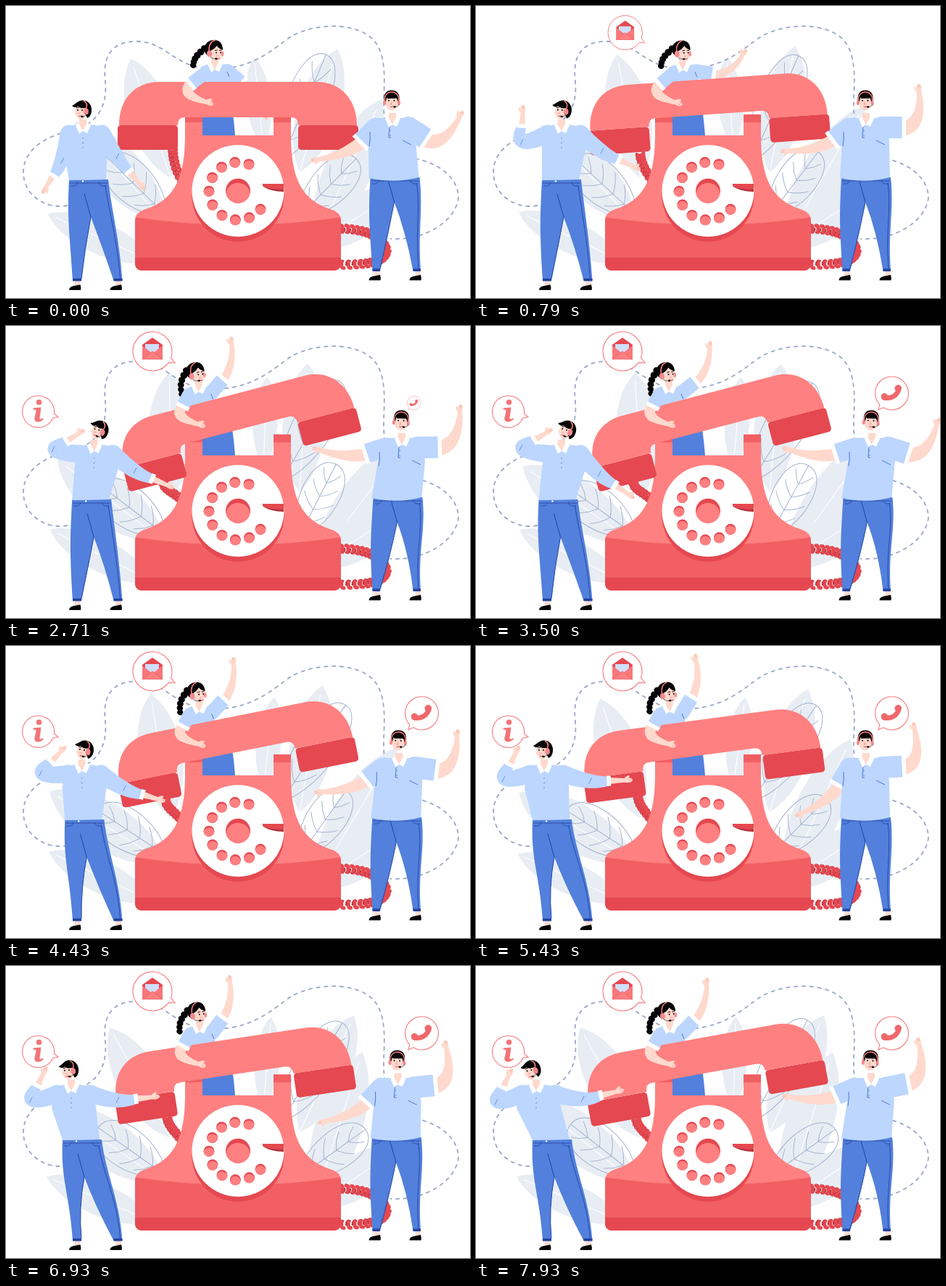
Recreate the animation shown at these times as an HTML page with a canvas. Size 640 by 404 pixels, loop 8000 ms.

```html
<!DOCTYPE html>
<html lang="en">
<head>
<meta charset="utf-8">
<title>Call centre</title>
<style>
html, body { margin: 0; width: 100%; height: 100%; overflow: hidden; background: #fff; }
canvas { display: block; width: 640px; height: 404px; }
</style>
</head>
<body>
<canvas id="stage"></canvas>
<script>
const W = 640, H = 404, LOOP = 8000, STEP = 1000 / 14;
const canvas = document.getElementById('stage');
const g = canvas.getContext('2d');
const ratio = window.devicePixelRatio || 1;
canvas.width = W * ratio;
canvas.height = H * ratio;

const CORAL = '#ff8080', MID = '#f15f63', RED = '#e54850', DEEP = '#b3323c', PAD = '#f58a8e';
const SHIRT = '#bcd6fe', JEANS = '#5280dc', NAVY = '#2243a0', FOLD = '#3f6ccb', SKIN = '#ffd9cd';
const LEAF = '#e8edf4', VEIN = '#a3b2cc', BLACK = '#050507', WHITE = '#fff';

// Motion: everyone shares five beats, then a slow late drift
const BEATS = [0, 790, 1930, 3500, 5430];
const rad = d => d * Math.PI / 180;
const clamp = u => Math.max(0, Math.min(1, u));
const late = t => clamp((t - 5430) / 2500) ** 2;
const breeze = t => Math.cos((t - 2700) / 9400 * 2 * Math.PI);
const drift = t => Math.cos((t - 5200) / 12000 * 2 * Math.PI);

// Smooth curve through one value per beat, level at each turning point
function mix(t, ...v) {
  const n = BEATS.length - 1;
  if (t >= BEATS[n]) return v[n];
  const i = BEATS.findIndex((b, k) => t < BEATS[k + 1]);
  const span = BEATS[i + 1] - BEATS[i], u = (t - BEATS[i]) / span;
  const slope = k => {
    if (k === 0) return (v[1] - v[0]) / BEATS[1] * span;
    if (k === n || (v[k] - v[k - 1]) * (v[k + 1] - v[k]) <= 0) return 0;
    return (v[k + 1] - v[k - 1]) / (BEATS[k + 1] - BEATS[k - 1]) * span;
  };
  const d = v[i + 1] - v[i], a = slope(i), b = slope(i + 1);
  return v[i] + u * (a + u * (3 * d - 2 * a - b + u * (a + b - 2 * d)));
}

const reach = (p, len, deg) => [p[0] + len * Math.cos(rad(deg)), p[1] + len * Math.sin(rad(deg))];
const along = (a, b, u) => [a[0] + (b[0] - a[0]) * u, a[1] + (b[1] - a[1]) * u];
const heading = (a, b) => Math.atan2(b[1] - a[1], b[0] - a[0]);

function shape(d, fill, stroke, lw = 1) {
  const p = new Path2D(d);
  if (fill) { g.fillStyle = fill; g.fill(p); }
  if (stroke) { g.strokeStyle = stroke; g.lineWidth = lw; g.stroke(p); }
}

function oval(x, y, rx, ry, fill, rot = 0) {
  g.fillStyle = fill;
  g.beginPath();
  g.ellipse(x, y, rx, ry, rot, 0, Math.PI * 2);
  g.fill();
}

const dot = (x, y, r, fill) => oval(x, y, r, r, fill);

function box(x, y, w, h, fill) {
  g.fillStyle = fill;
  g.fillRect(x, y, w, h);
}

function place(x, y, angle, draw, scale = 1) {
  g.save();
  g.translate(x, y);
  g.rotate(angle);
  g.scale(scale, scale);
  draw();
  g.restore();
}

// Tapered curve from a to c, bent towards b
function limb(a, b, c, wa, wb, wc, fill, bend = 0.85) {
  const n = 22, left = [], right = [];
  const m = along(along(a, c, 0.5), b, 1 + bend);
  for (let i = 0; i <= n; i++) {
    const u = i / n, from = along(a, m, u), to = along(m, c, u);
    const [x, y] = along(from, to, u), dir = heading(from, to);
    const w = (u < 0.5 ? wa + (wb - wa) * u * 2 : wb + (wc - wb) * (u * 2 - 1)) / 2;
    left.push([x - Math.sin(dir) * w, y + Math.cos(dir) * w]);
    right.unshift([x + Math.sin(dir) * w, y - Math.cos(dir) * w]);
  }
  g.fillStyle = fill;
  g.beginPath();
  left.concat(right).forEach(p => g.lineTo(p[0], p[1]));
  g.fill();
  dot(a[0], a[1], wa / 2, fill);
}

function cuff(from, to, width) {
  place(to[0], to[1], heading(from, to), () => box(-2.5, -width / 2, 5.5, width, WHITE));
}

function hand(from, to) {
  place(to[0], to[1], heading(from, to), () => {
    oval(0, 0, 6.5, 3.5, SKIN);
    oval(-1, -4, 4, 1.5, SKIN, -0.5);
    shape('M1 -1 L6 -1.3 M1 1.2 L6 1', null, '#f4a79b', 0.6);
  });
}

function longArm(s, upper, fore, len1, len2) {
  const e = reach(s, len1, upper), h = reach(e, len2, fore), w = along(e, h, 0.5);
  limb(w, along(w, h, 0.5), h, 9, 7, 5, SKIN);
  hand(w, h);
  limb(s, e, w, 25, 20, 13, SHIRT, 0.75);
  cuff(e, w, 14);
  shape(`M${e[0] + 3} ${e[1] - 5} l-4 8`, null, '#5b8be0', 0.9);
}

function shortArm(s, upper, fore, len1, len2, sleeve, arm) {
  const e = reach(s, len1, upper), h = reach(e, len2, fore), c = along(s, e, 0.64);
  limb(s, e, h, arm, arm * 0.85, 5.5, SKIN, 0.6);
  hand(e, h);
  limb(s, along(s, c, 0.5), c, sleeve, sleeve, sleeve, SHIRT);
  cuff(s, c, sleeve + 1);
}

// Leaves lean from upright by angle + swing * wind
const leaves = [
  { x: 227, y: 238, len: 174, w: 40, angle: -15, swing: 14.5, wind: breeze },
  { x: 205, y: 355, len: 162, w: 30, angle: -65, swing: 2, wind: breeze },
  { x: 220, y: 300, len: 188, w: 43, angle: -50, swing: -9, wind: drift },
  { x: 405, y: 230, len: 178, w: 39, angle: 14.5, swing: -11, wind: breeze },
  { x: 355, y: 195, len: 125, w: 23, angle: 0.5, swing: 7, wind: drift },
  { x: 425, y: 330, len: 221, w: 43, angle: 27, swing: 10, wind: breeze },
  { x: 420, y: 335, len: 153, w: 38, angle: 57, swing: 1, wind: breeze },
  { x: 380, y: 215, len: 160, w: 36, angle: 28, swing: 6, wind: drift, veined: true },
  { x: 404, y: 292, len: 113, w: 34, angle: 41, swing: -14, wind: breeze, veined: true },
  { x: 221, y: 290, len: 115, w: 36, angle: -51, swing: -6, wind: drift, veined: true }
];

function drawLeaf({ x, y, len: L, w, angle, swing, wind, veined }, t) {
  place(x, y, rad(angle + swing * wind(t) - 90), () => {
    if (!veined) {
      shape(`M0 0 C${L * .25} ${-w} ${L * .78} ${-w} ${L} 0 C${L * .78} ${w} ${L * .25} ${w} 0 0Z`, LEAF);
      shape(`M0 0 L${L * .93} 0`, null, WHITE, 1.1);
      return;
    }
    shape(`M0 0 C${L * .25} ${-w} ${L} ${-w * 1.1} ${L} 0 C${L} ${w * 1.1} ${L * .25} ${w} 0 0Z M0 0 H${L}`, null, VEIN);
    for (let k = 0.2; k < 0.8; k += 0.18) {
      const rise = w * 0.66 * Math.sin(Math.PI * Math.min(0.8, k + 0.12));
      for (const s of [-rise, rise]) shape(`M${L * k} 0 Q${L * (k + .06)} ${s * .6} ${L * (k + .16)} ${s}`, null, VEIN, 0.9);
    }
  });
}

function coil(p, n) {
  const point = u => {
    const [a, b, c] = [0, 1, 2].map(i => along(p[i], p[i + 1], u));
    return along(along(a, b, u), along(b, c, u), u);
  };
  g.lineCap = 'round';
  for (let i = 0; i < n; i++) {
    const a = point(i / n), b = point((i + 1) / n), m = along(a, b, 0.5);
    place(m[0], m[1], heading(a, b), () => {
      shape('M-1 5 Q4 6 4 0', null, DEEP, 3);
      shape('M-2 -4.5 Q2.5 -5 1 4.5', null, RED, 5);
    });
  }
  g.lineCap = 'butt';
}

function dashes() {
  g.setLineDash([5.8, 5]);
  shape('M85 276 C55 282 24 262 24 230 C24 196 60 178 92 172 C125 163 140 140 137 105 C132 65 150 48 182 49'
    + ' C215 50 230 76 262 84 C330 97 365 62 392 43 C425 23 480 22 505 45 C525 65 522 100 521 130'
    + ' C520 170 530 200 560 210 C600 217 624 240 624 265 C620 300 575 325 530 322', null, '#9aa8c6', 1.8);
  g.setLineDash([]);
}

function cup(x, y, r, drop) {
  g.save();
  g.beginPath();
  g.arc(x, y, r, 0, 7);
  g.clip();
  dot(x, y, r + 1, RED);
  dot(x, y + drop, r, CORAL);
  g.restore();
}

function phoneBase() {
  g.save();
  g.clip(new Path2D('M247 150 H271 V179 H369 V150 H393 V178 C393 245 412 270 450 282 Q462 286 462 297'
    + ' V355 Q462 366 451 366 H189 Q178 366 178 355 V297 Q178 286 190 282 C228 270 247 245 247 178Z'));
  box(170, 140, 300, 230, CORAL);
  shape('M170 291 Q320 315 470 291 V370 H170Z', MID);
  box(170, 348, 300, 20, RED);
  box(247, 150, 24, 11, MID);
  box(369, 150, 24, 11, MID);
  g.restore();
  dot(320, 262.5, 63.5, RED);
  dot(320, 255.7, 63.5, WHITE);
  cup(320, 255.7, 17, 6);
  for (let i = 0; i < 10; i++) {
    const [x, y] = reach([320, 256], 40, -68 - i * 28.1);
    cup(x, y, 7.5, 2.5);
  }
  shape('M354 246 H383 V257 Q366 257 355 250Z', DEEP);
  shape('M354 246 H383 V254 Q366 254 355 250 Q354 249 354 246Z', RED);
}

function handset(t, tilt) {
  const x = mix(t, 320, 322.5, 326, 326, 315) + 5 * late(t);
  const y = mix(t, 182, 178, 171, 171, 179) - 3 * late(t);
  place(x, y, rad(tilt), () => {
    g.translate(-320, -182);
    g.fillStyle = RED;
    for (const left of [154, 403]) {
      g.beginPath();
      g.roundRect(left, 165, 83, 34, 4.5);
      g.fill();
    }
    shape('M156 165 C156 128 178 105 212 105 H429 C462 105 484 130 484 165 H403 Q403 154 393 154 H246 Q237 154 237 165Z', CORAL);
  });
}

function collar(x, y) {
  shape(`M${x - 5} ${y - 12} h10 v9 l-5 7 l-5 -8Z`, SKIN);
  shape(`M${x - 6} ${y - 7} l6 11 l-5 4 l-5 -12Z M${x + 6} ${y - 8} l-6 12 l6 3 l5 -11Z`, WHITE);
}

function legs(hip, y, half, fl, fr, ankle, drop, cuffW) {
  const cx = hip + (half < 30 ? 3 : -1), cy = y + drop, l2 = fl + cuffW, r2 = fr + cuffW;
  for (const x of [fl, fr]) {
    box(x + 3, ankle, 7, 10, SKIN);
    shape(`M${x - 5} ${ankle + 16} q0 -5 8 -6 l7.5 -1.5 q1.5 4.5 .5 7.5Z`, BLACK);
  }
  shape(`M${hip - half} ${y} C${hip - half - 3} ${y + 55} ${fl - 4} ${ankle - 60} ${fl} ${ankle + 3} H${l2}`
    + ` Q${cx - 8} ${cy + 42} ${cx} ${cy} Q${cx + 16} ${cy + 42} ${fr} ${ankle + 3} H${r2}`
    + ` C${r2 - 4} ${ankle - 55} ${hip + half + 5} ${y + 45} ${hip + half} ${y}Z`, JEANS);
  shape(`M${cx - 9} ${cy - 32} L${cx} ${cy} Q${cx - 8} ${cy + 42} ${l2} ${ankle}`, null, NAVY);
  shape(`M${r2 - 3} ${ankle} C${r2 - 7} ${ankle - 55} ${hip + half + 1} ${y + 45} ${hip + half - 4} ${y + 8}`, null, NAVY, 0.9);
  shape(`M${hip - half + 1} ${y + 5} H${hip + half - 1} M${hip - half + 2} ${y + 9} q9 1 10 -5`
    + ` M${hip + half - 3} ${y + 9} q-9 1 -10 -5`, null, NAVY, 0.8);
  box(fl, ankle, cuffW, 3.6, NAVY);
  box(fr, ankle, cuffW, 3.6, NAVY);
  dot(hip - 8, y + 2.5, 1.2, WHITE);
}

function torso(x, cy, sl, sr, hip, half, y, top, pad, sag) {
  shape(`M${x - 9} ${cy - 5} Q${sl[0]} ${sl[1] - top} ${sl[0] - 4} ${sl[1] - top + 2} L${sl[0] - pad} ${sl[1] + 20}`
    + ` L${hip - half} ${y} Q${hip} ${y + sag} ${hip + half - 3} ${y - 1} L${sr[0] + pad} ${sr[1] + 18}`
    + ` L${sr[0] + 3} ${sr[1] - top + 1} L${x + 10} ${cy - 5}Z`, SHIRT);
}

function buttons(x, y) {
  for (let i = 0; i < 3; i++) dot(x, y + i * 6.5, 0.8, '#5b7fc4');
}

function face(eyes, y, mouth) {
  for (const x of eyes) {
    dot(x, y, 1, BLACK);
    shape(`M${x - 2} ${y - 3} l3.6 -.5`, null, BLACK, 0.9);
  }
  oval(mouth - 1, y + 4.5, 2, 1.3, '#ffb9b0');
  shape(`M${mouth - 2} ${y + 8} q2 1.6 4 -.4`, null, '#d9434c');
}

function mic(x, y, tx, ty) {
  shape(`M${x} ${y} Q${x} ${ty} ${tx} ${ty}`, null, '#555', 0.8);
  oval(tx, ty, 1.8, 1.2, BLACK);
}

function headLeft() {
  oval(-1.5, 1, 8, 11, SKIN);
  shape('M-9 0 L-11 4 L-8 5Z', SKIN);
  shape('M-14 -7 Q-10 -9 -8 -11 Q-1 -17 7 -13 Q14 -8 13 1 Q12 8 7 10 L4 4 L5 -4 Q-2 -3 -6 -6 Q-10 -3 -14 -7Z', BLACK);
  face([-6, 0], -1, -3);
  shape('M5 -2 Q9 -10 2 -14', null, CORAL, 1.5);
  oval(5.5, 1, 3.4, 4.4, PAD);
  mic(5, 4, 0, 8);
}

function headRight() {
  oval(0, 2, 9, 11.5, SKIN);
  shape('M-10 3 Q-13 -14 0 -14.5 Q13 -14 10 3 L8 1 Q8 -4 4 -4 Q-3 -2 -7 -4 L-8 1Z', BLACK);
  face([-4, 3.5], 0, 0);
  shape('M0 1 l-1 4 h2', null, '#e89a8f', 0.7);
  shape('M-9.5 0 C-11.5 -16 11.5 -16 9.5 0', null, CORAL, 1.4);
  oval(-10, 3, 2, 3.4, PAD);
  oval(10, 3, 2, 3.4, PAD);
  mic(9.5, 5, 4, 8.5);
}

function headWoman() {
  oval(2, 4, 9, 10, SKIN);
  shape('M-15 -2 Q-13 -15 0 -15 Q11 -14 11 -1 Q4 -4 3 -7 Q-1 -2 -6 0 L-6 7 Q-13 7 -15 -2Z', BLACK);
  face([2, 8], 2.5, 5);
  shape('M-8 1 Q-9 -12 1 -15', null, CORAL, 1.4);
  oval(-7.5, 4, 3.4, 4.4, PAD);
  oval(10.5, 4, 1.8, 3.4, PAD);
  mic(-6, 8, 2, 11);
}

// Her lean to the left, and the collar that follows it
function womanLean(t) {
  const lean = mix(t, 0, 3, 20, 22, 21);
  return { lean, x: 288 - lean, y: 84 + lean * 0.13 };
}

function womanBehind(t) {
  const { lean, x, y } = womanLean(t), l = late(t);
  shape('M271 120 H308 Q314 150 316 179 H271Z', JEANS);
  shortArm([x + 17, y + 6], mix(t, 40, 8, -60, -38, -58) + 12 * l, mix(t, 60, -50, -97, -80, -94) + 12 * l, 41, 41, 20, 13);
  shape(`M${x - 8} ${y - 4} l-11 4 l-2 38 h43 l-1 -39 l-13 -3Z`, SHIRT);
  shape(`M${x + 17} ${y + 7} l3 7`, null, FOLD, 0.9);
  collar(x, y);
  const hx = x - lean * 0.12, hy = y - 22;
  const root = [hx - 14, hy - 3], tip = reach([hx, hy], 36, mix(t, 146, 145, 124, 127, 134));
  for (let i = 0; i <= 5; i++) {
    const u = i / 5, p = along(root, tip, u);
    oval(p[0] - Math.sin(u * Math.PI) * 4, p[1], 5.2 - u, 4.6 - u * 0.8, BLACK, 0.6);
  }
  place(hx, hy, rad(-lean * 0.3), headWoman);
}

function womanInFront(t) {
  const { lean, x, y } = womanLean(t);
  const s = [x - 14, y + 9], c = [x - 33 + lean / 2, y + 24];
  const e = [x - 36 + lean / 2, y + 38], h = [x - 8 + lean / 2, y + 50];
  limb(c, e, h, 15, 14, 5, SKIN);
  hand(e, h);
  limb(s, along(s, c, 0.5), c, 18, 18, 18, SHIRT);
  cuff(s, c, 19);
}

function leftMan(t) {
  const l = late(t), y = 169;
  const x = mix(t, 106, 118, 122, 118, 94) - 11 * l;
  const hip = mix(t, 114, 118, 121, 113.5, 105);
  const nod = mix(t, 0, 4, 14, 17, 0) - 12 * l;
  const sl = [x - 19, y + 8], sr = [x + 26, y + 8];
  legs(hip, 240, 27, 92, 148.5, 377, 52, 12);
  torso(x, y, sl, sr, hip, 27, 241, 11, 8, 0);
  longArm(sl, mix(t, 105, 162, 181, 191, 168) - 6 * l, mix(t, 121, 274, 319, 329, 296), 39, 46);
  longArm(sr, mix(t, 57, 40, 30, 48, 16) - 4 * l, mix(t, 50, 25, 12, 34, -2) - 11 * l, 38, 53);
  buttons(x, y + 14);
  collar(x, y);
  place(x - 1 + nod * 0.45, y - 24, rad(nod), headLeft);
}

function rightMan(t) {
  const l = late(t), y = 160;
  const x = mix(t, 533, 538, 545, 546, 538) + 7 * l;
  const hip = 538 + (x - 538) * 0.3;
  const sl = [x - 23, y + 8], sr = [x + 22, y + 8];
  const stretch = mix(t, 152, 160, 176, 179, 137) + 36 * l;
  legs(hip, 237, 34, 505.5, 561.5, 363.5, 34, 10.5);
  shortArm(sl, stretch - 17, stretch + 14, 45, 53, 27, 19);
  shortArm(sr, mix(t, 33, 0, -18, 17, -3) - 8 * l, mix(t, -53, -86, -92, -64, -93), 47, 54, 30, 22);
  torso(x, y, sl, sr, hip, 36, 238, 14, 10, 8);
  shape(`M${sl[0] - 8} ${sl[1] + 6} q1 10 -1 20 M${sr[0] - 8} ${sr[1] + 18} l12 6`, null, FOLD, 0.9);
  shape(`M${x - 4} ${y + 4} l-1 18 h3`, null, FOLD, 0.9);
  buttons(x - 3, y + 6);
  collar(x, y);
  place(x - 1, 131, rad((x - 533) * 0.35), headRight);
}

function bubble(t, start, tip, c, r, icon) {
  const u = clamp((t - start) / 700);
  if (!u) return;
  place(tip[0], tip[1], 0, () => {
    const x = c[0] - tip[0], y = c[1] - tip[1], a = Math.atan2(-y, -x);
    g.beginPath();
    g.arc(x, y, r, a + 0.14, a - 0.14 + Math.PI * 2);
    g.lineTo(0, 0);
    g.closePath();
    g.fillStyle = WHITE;
    g.fill();
    g.strokeStyle = '#f77c7f';
    g.lineWidth = 1.1;
    g.stroke();
    g.translate(x, y);
    icon();
  }, 1 - (1 - u) ** 1.45);
}

function envelope() {
  shape('M-14 -9 L0 -19 L14 -9 V11 H-14Z', RED);
  shape('M-10 -10 H9 V2 H-10Z', '#cfe0fb');
  shape('M-14 -8 L0 3 L14 -8 V11 H-14Z', '#f9777a');
  shape('M-14 11 L0 0 L14 11Z', CORAL, '#e8585f', 0.7);
}

function info() {
  dot(1, -13, 3.8, '#f47478');
  shape('M-7 -5 L4 -6 L2 8 Q1 12 7 9 L7 11 Q2 15 -2 14 Q-6 13 -5 8 L-3 -1 Q-3 -3 -7 -3Z', '#f47478');
}

function receiver() {
  place(0, 0, -0.56, () => {
    shape('M-11 1 Q0 9 11 1', null, '#f0686c', 6.5);
    oval(-11, -1, 4.8, 5, '#f0686c', -0.2);
    oval(11, -1, 4.8, 5, '#f0686c', 0.2);
  });
}

function draw(t) {
  g.setTransform(ratio, 0, 0, ratio, 0, 0);
  box(0, 0, W, H, WHITE);
  leaves.forEach(leaf => drawLeaf(leaf, t));
  dashes();

  const tilt = mix(t, 0, -4.1, -14.7, -14.7, -7.6) - 2.7 * late(t);
  const plug = [230 + tilt * 0.9, 198 - tilt * 1.2];
  coil([plug, [plug[0], plug[1] + 12], [234, 230], [244, 243]], 8);
  coil([[459, 308], [494, 308], [520, 318], [525, 338]], 13);
  coil([[525, 338], [523, 355], [500, 358], [459, 358]], 12);

  womanBehind(t);
  phoneBase();
  handset(t, tilt);
  womanInFront(t);
  bubble(t, 250, [233, 51], [202, 35], 27, envelope);
  bubble(t, 1700, [72, 126], [44.5, 118.5], 22, info);
  bubble(t, 2500, [555, 116], [573.5, 93], 23, receiver);
  leftMan(t);
  rightMan(t);
}

const began = performance.now();
function tick() {
  const t = (performance.now() - began) % LOOP;
  draw(Math.floor((t + 4) / STEP) * STEP);
  requestAnimationFrame(tick);
}
tick();
</script>
</body>
</html>
```
